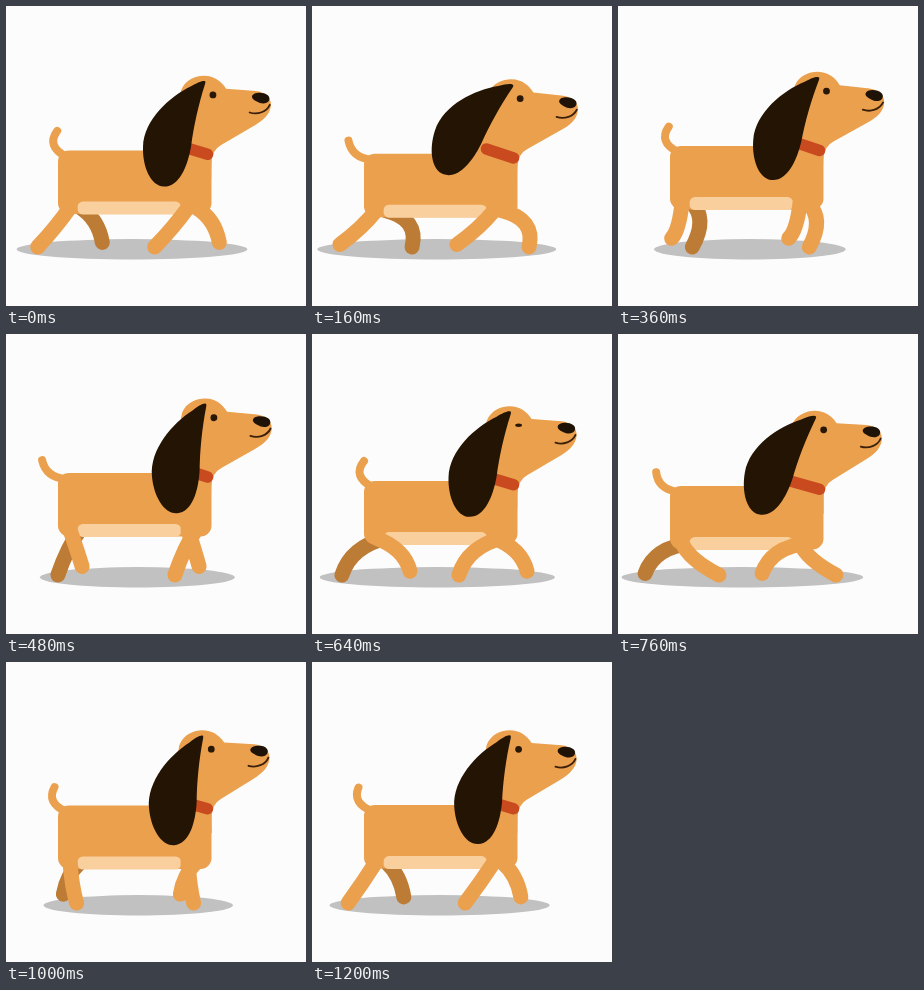
Write an HTML page that moves like this. It is 300 px wide and 300 px high and loops after 1.24 s.

```html
<!DOCTYPE html>
<html lang="en">
<head>
<meta charset="utf-8">
<title>Walking dog</title>
<style>
  html, body { margin: 0; width: 100%; height: 100%; overflow: hidden; background: #fcfcfc; }
  svg { display: block; width: 100%; height: 100%; }
  .coat { fill: #eba04e; }
  .limb { fill: none; stroke: #eba04e; stroke-width: 15; stroke-linecap: round; }
  .dark { stroke: #bc7c35; }
</style>
</head>
<body>
<svg viewBox="0 0 300 300">
  <ellipse id="shadow" cy="243.3" ry="10.2" fill="#c1c1c1"/>
  <path id="tail" class="limb" style="stroke-width:8"/>
  <path id="hindFar" class="limb dark"/>
  <g id="body">
    <rect class="coat" x="52" y="144" width="153.5" height="63.5" rx="11"/>
    <rect x="71.5" y="195" width="103.5" height="13" rx="5.5" fill="#f9cf9e"/>
  </g>
  <path id="foreFar" class="limb"/>
  <path id="hindNear" class="limb"/>
  <path id="foreNear" class="limb"/>
  <g id="head">
    <path class="coat" d="M163 150L174 84C178 73 189 69 197 69C207 69 214 74 219 81.500L249 83.500C261 85 265 92 264 99C263 106 258 112 248 118L215 138Q206 143 205.500 156V172H163Z"/>
    <path d="M174 139.500L201.500 147.500" fill="none" stroke="#c94a1f" stroke-width="11.500" stroke-linecap="round"/>
    <ellipse id="eye" cx="206" cy="88" rx="3.400" fill="#2a1807"/>
    <path d="M245 89C246 85 252 84.500 257 85.500C262 87 263.500 90 262 93C260 96.500 254 96.500 250 94C247 92.500 245 91 245 89Z" fill="#1f1206"/>
    <path d="M243 105C251 107.500 260 104 263 97" fill="none" stroke="#3a1f0a" stroke-width="1.800" stroke-linecap="round"/>
    <path id="ear" d="M198 74.500C196 73 190 76 184 80C163 91 138 115 138 142C138 162 147 181 160 181C175 181 183 161 186 140C188 120 192 98 198 77Q198.500 75 198 74.500Z" fill="#231404"/>
  </g>
</svg>
<script>
const LOOP = 1240, STRIDE = LOOP / 2, WAG = LOOP / 4, STEP = 40;
const REACH = 725;   // when the near feet are furthest forward
const BLINK = 680;
const $ = id => document.getElementById(id);
const angle = (t, period, peak) => 2 * Math.PI * (t - peak) / period;
const wave = (t, period, peak) => Math.cos(angle(t, period, peak));

function set(id, attrs) {
  for (const name in attrs) $(id).setAttribute(name, attrs[name]);
}

// The near knee folds as the leg reaches forward.
function nearKnee(a, hip, foot) {
  const k = .4 - .3 * Math.sin(2 * a) * (1 + Math.cos(a));
  return [hip + k * (foot - hip), 229 - 17 * k];
}

// The far knee stays above the foot and pushes forward after landing.
function farKnee(a, hip, foot) {
  const push = Math.max(0, Math.cos(a - .9)) ** 2;
  return [hip + .8 * (foot - hip) + 18 * push, 213];
}

// Feet swing like a pendulum and lift while they travel forward.
function leg(id, t, bob, hip, middle, knee) {
  const a = angle(t, LOOP, REACH);
  const x = middle + 37.5 * Math.cos(a);
  const y = 241 - 9 * Math.max(0, -Math.sin(a));
  const [kx, ky] = knee(a, hip, x);
  set(id, { d: `M${hip} ${201 + bob}Q${kx} ${ky} ${x} ${y}` });
}

function draw(t) {
  const bob = .9 + 5 * wave(t, STRIDE, 150) + 2.5 * wave(t, LOOP, 880);
  const tilt = .8 + 1.6 * wave(t, LOOP, 300);
  const flap = 3 + 11 * wave(t, STRIDE, 180) - 3 * wave(t, LOOP, 880);
  const sway = 8 - 8 * wave(t, WAG, 22);
  const rx = 108 + 14 * wave(t, STRIDE, 100);
  const open = Math.min(1, Math.max(.1, Math.abs(t - BLINK) / 80));
  const move = `translate(0 ${bob})`;

  set('shadow', { cx: 127 + (112 - rx) * .3, rx });
  set('body', { transform: move });
  set('tail', { transform: move, d: `M60 150Q40 ${139 + sway * .6} ${52 - sway} ${124 + sway * .45}` });
  set('head', { transform: `${move} rotate(${tilt} 180 150)` });
  set('ear', { transform: `rotate(${flap} 197 77)` });
  set('eye', { ry: 3.4 * open });

  leg('hindNear', t, bob, 64, 64, nearKnee);
  leg('foreNear', t, bob, 182, 181, nearKnee);
  leg('hindFar', t + STRIDE, bob, 74, 64, farKnee);
  leg('foreFar', t + STRIDE, bob, 190, 181, farKnee);
}

const start = performance.now();
function tick(now) {
  const t = Math.max(0, now - start) % LOOP;
  draw(t < 2 * STEP ? 0 : Math.floor(t / STEP) * STEP);
  requestAnimationFrame(tick);
}
draw(0);
requestAnimationFrame(tick);
</script>
</body>
</html>
```
